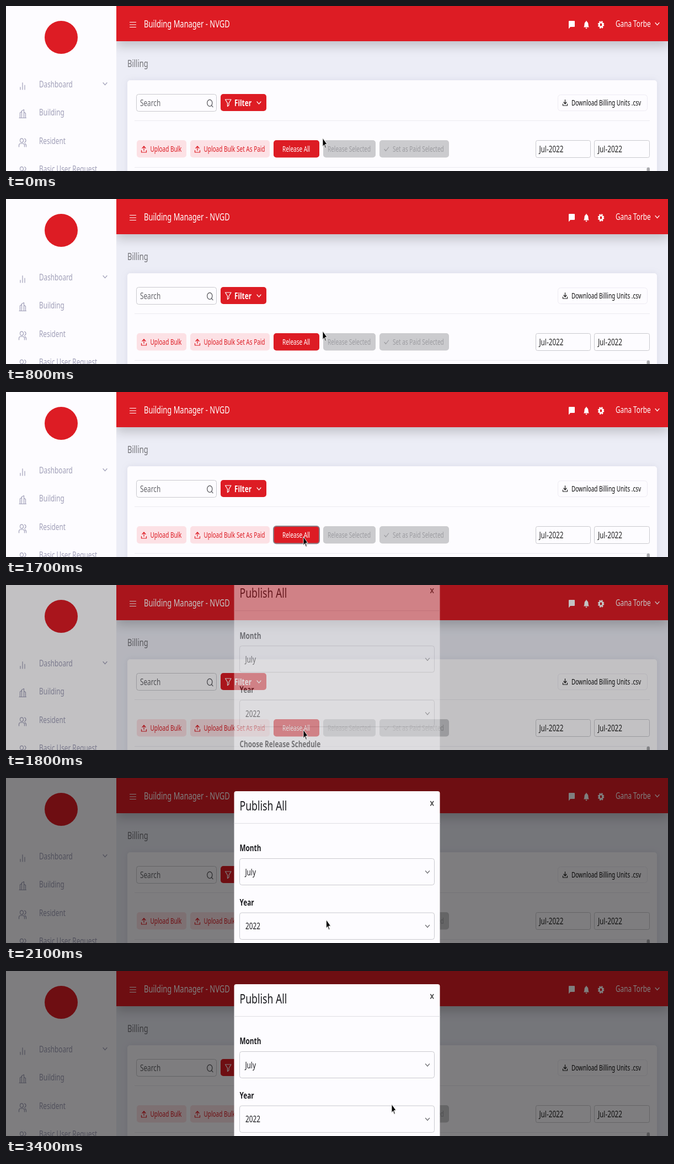
Animation, 1200 px wide and 300 px high, one loop 3.5 s. Source, as an HTML page:

```html
<!DOCTYPE html>
<html lang="en">
<meta charset="utf-8">
<title>Billing</title>
<style>
html, body { margin: 0; width: 100%; height: 100%; overflow: hidden; }
svg { display: block; width: 1200px; height: 300px; background: #ecedf6; }
/* the whole screen is squeezed sideways by one factor */
text { font: 16px "Noto Sans", sans-serif; transform-box: fill-box; transform-origin: 0 0; transform: scaleX(.735); }
.big { font-size: 17.6px; }
.btn text, .btn tspan { font-size: 13.6px; }
.bold { font-weight: 600; }
.line { fill: none; stroke-width: 1.2; stroke-linecap: round; stroke-linejoin: round; }
.box { fill: #fdfcff; stroke: #c9c9ce; }
</style>
<svg viewBox="0 0 1200 300">
  <defs>
    <path id="chevron" d="M-3.5-2L0 2.2 3.5-2"/>
    <path id="upload" d="M-4.5 2V5.5H4.5V2M0 2V-5.5M-3-2L0-5.5 3-2"/>
    <path id="people" d="M-6 8V5.5Q-6 2-2.5 2H.5Q4 2 4 5.5V8M-4-3.5a3 3.7 0 0 1 6 0a3 3.7 0 0 1-6 0M4-7q2.5 1 2.5 3.6T4 .2M4.8 2.4Q7 3 7 6V8"/>
  </defs>

  <rect x="200" width="1000" height="64" fill="#dd1c24" style="filter:drop-shadow(0 8px 10px rgba(0,0,0,.2))"/>
  <g fill="#fff">
    <path class="line" stroke="#fff" d="M224.500 29.500h11M224.500 34h11M224.500 38.500h11"/>
    <text class="big" x="250" y="39">Building Manager - NVGD</text>
    <path d="M1021 27h9q1 0 1 1v9q0 1-1 1h-7l-3 3.500v-13.500q0-1 1-1z"/>
    <path d="M1047 38.500q1.500-1.500 1.500-5 0-4.500 3.500-5.500 3.500 1 3.500 5.500 0 3.500 1.500 5zM1050.500 39.500h3q-.3 2-1.500 2t-1.500-2zM1051.300 27h1.400v2h-1.400z"/>
    <ellipse cx="1078.500" cy="34" rx="3.100" ry="4.100" fill="none" stroke="#fff" stroke-width="2.600"/>
    <ellipse cx="1078.500" cy="34" rx="4.700" ry="6" fill="none" stroke="#fff" stroke-width="2" stroke-dasharray="2.400 1.850"/>
    <text x="1105" y="38.500">Gana Torbe</text>
    <use href="#chevron" x="1180.500" y="32.500" class="line" stroke="#fff"/>
  </g>

  <rect width="200" height="300" fill="#fdfcff"/>
  <circle cx="100" cy="57" r="30" fill="#dd1c24"/>
  <g fill="#a09fb8">
    <text x="60" y="147.700">Dashboard</text>
    <text x="60" y="199.500">Building</text>
    <text x="60" y="250.800">Resident</text>
    <text x="60" y="301.800">Basic User Request</text>
  </g>
  <g class="line" stroke="#a09fb8">
    <path d="M26 147.500V152M30 139.500V152M34 144V152"/>
    <path d="M24 203.500h12.500M25.500 203V194l3-2M28.500 203V190.500l4-2V203M32.500 193l3 2v8"/>
    <use href="#people" x="29.500" y="248"/>
    <use href="#people" x="29.500" y="299.500"/>
    <use href="#chevron" x="179.500" y="141.500"/>
  </g>

  <text class="big" x="220" y="111.300" fill="#737378">Billing</text>
  <rect x="220" y="135" width="960" height="180" rx="5" fill="#fdfcff" style="filter:drop-shadow(0 0 6px rgba(80,80,120,.1))"/>
  <path d="M233 208.500h934M233 293.500h934" stroke="#ebeaf0"/>
  <rect x="1161.500" y="293.500" width="5.500" height="14" rx="2.700" fill="#a9a9ad"/>

  <rect class="box" x="236.500" y="160.500" width="145" height="31" rx="4"/>
  <text x="243" y="182" fill="#66666b">Search</text>
  <g class="line" stroke="#55555a"><ellipse cx="369.300" cy="176.300" rx="4.600" ry="6"/><path d="M372.500 180.700l2.500 3"/></g>
  <rect x="389" y="160" width="83" height="31" rx="5" fill="#dd1c24"/>
  <g class="line" stroke="#fff"><path d="M397.500 170h10.500l-4 6.500v4l-2.500 2v-6z"/><use href="#chevron" x="458.500" y="176"/></g>
  <text class="bold" x="414" y="182" fill="#fff">Filter</text>

  <g class="btn">
    <rect x="1000.500" y="161.500" width="162" height="29" rx="5" fill="#fdfcff" stroke="#eeebf3"/>
    <path class="line" stroke="#222" d="M1009.500 178v3h8v-3M1013.500 170.500v7M1011 175l2.500 3 2.500-3"/>
    <text x="1025" y="181" fill="#111" font-weight="500" style="font-weight:500">Download Billing Units .csv</text>
    <g fill="#fce1e5"><rect x="237" y="244" width="90" height="31.500" rx="5"/><rect x="334" y="244" width="144" height="31.500" rx="5"/></g>
    <g class="line" stroke="#dd1c24"><use href="#upload" x="250" y="260.500"/><use href="#upload" x="347" y="260.500"/></g>
    <g fill="#dd1c24">
      <text x="261.500" y="265">Upload Bulk</text>
      <text x="358.500" y="265">Upload Bulk Set As Paid</text>
      <rect x="485" y="244" width="83" height="31.500" rx="5"/>
    </g>
    <rect id="ring" x="485" y="244" width="83" height="31.500" rx="5" fill="none" stroke="#8b8087" stroke-width="2"/>
    <text x="501" y="265" fill="#fff">Release All</text>
    <g fill="#cbcbce"><rect x="575" y="244" width="95" height="31.500" rx="5"/><rect x="677" y="244" width="126" height="31.500" rx="5"/></g>
    <g fill="#9c9ca0"><text x="583" y="265">Release Selected</text><text x="701" y="265">Set as Paid Selected</text></g>
    <path class="line" stroke="#9c9ca0" d="M686 260.500l2.500 3 5-6.500"/>
  </g>
  <rect class="box" x="960.500" y="244.500" width="99" height="31" rx="3"/>
  <rect class="box" x="1066.500" y="244.500" width="100" height="31" rx="3"/>
  <g fill="#222"><text x="967" y="265.700">Jul-2022</text><text x="1073.500" y="265.700">Jul-2022</text></g>

  <rect id="shade" width="1200" height="300"/>
  <g id="modal" fill="#1c1c20">
    <rect x="413.500" y="24" width="373" height="400" rx="4" fill="#fdfcff"/>
    <text x="423.500" y="58.700" style="font-size:24px">Publish All</text>
    <path class="line" stroke="#444" style="stroke-width:1.600" d="M769.700 42.500l5 7.500m0-7.500l-5 7.500"/>
    <path d="M413.500 82.500h373" stroke="#dfdfe3"/>
    <text class="bold" x="423.500" y="133.500">Month</text>
    <rect class="box" x="423.500" y="146.500" width="353" height="48" rx="4"/>
    <text x="434" y="176.700">July</text>
    <text class="bold" x="423.500" y="232">Year</text>
    <rect class="box" x="423.500" y="245" width="353" height="48.500" rx="4"/>
    <text x="434" y="275.500">2022</text>
    <text class="bold" x="423.500" y="331.200">Choose Release Schedule</text>
    <g class="line" stroke="#66666b"><use href="#chevron" x="764" y="171"/><use href="#chevron" x="764" y="269.500"/></g>
  </g>
  <path id="cursor" d="M0 0V16L3.700 12.500 6.200 18.400 8.600 17.400 6.100 11.600H11Z" stroke="#fff" stroke-width="1"/>
</svg>
<script>
const LOOP = 3500, STEP = 100;
const $ = id => document.getElementById(id);
const ramp = (t, from, length) => Math.min(1, Math.max(0, (t - from) / length));
const smooth = p => p * p * (3 - 2 * p);

// CSS ease-out: cubic-bezier(0, 0, .58, 1)
function easeOut(x) {
  let lo = 0, hi = 1;
  for (let i = 0; i < 20; i++) {
    const u = (lo + hi) / 2;
    if (1.74 * (1 - u) * u * u + u ** 3 < x) lo = u; else hi = u;
  }
  return 3 * lo * lo - 2 * lo ** 3;
}

function draw(now) {
  const t = Math.floor(now % LOOP / STEP) * STEP;
  const toButton = smooth(ramp(t, 1100, 500));
  const toForm = smooth(ramp(t, 1900, 600));
  const x = 574 - 35 * toButton + 160 * toForm;
  const y = 240 + 23 * toButton - 21 * toForm;
  $('cursor').setAttribute('transform', `translate(${x} ${y}) scale(.735 1)`);

  const fade = ramp(t, 1730, 150);
  $('shade').setAttribute('opacity', fade / 2);
  $('modal').setAttribute('opacity', fade);
  $('modal').setAttribute('transform', `translate(0 ${50 * easeOut(ramp(t, 1745, 300)) - 50})`);
  $('ring').setAttribute('opacity', t >= 1600 && t < 1800 ? 1 : 0);
  requestAnimationFrame(draw);
}
draw(performance.now());
</script>
</html>
```
